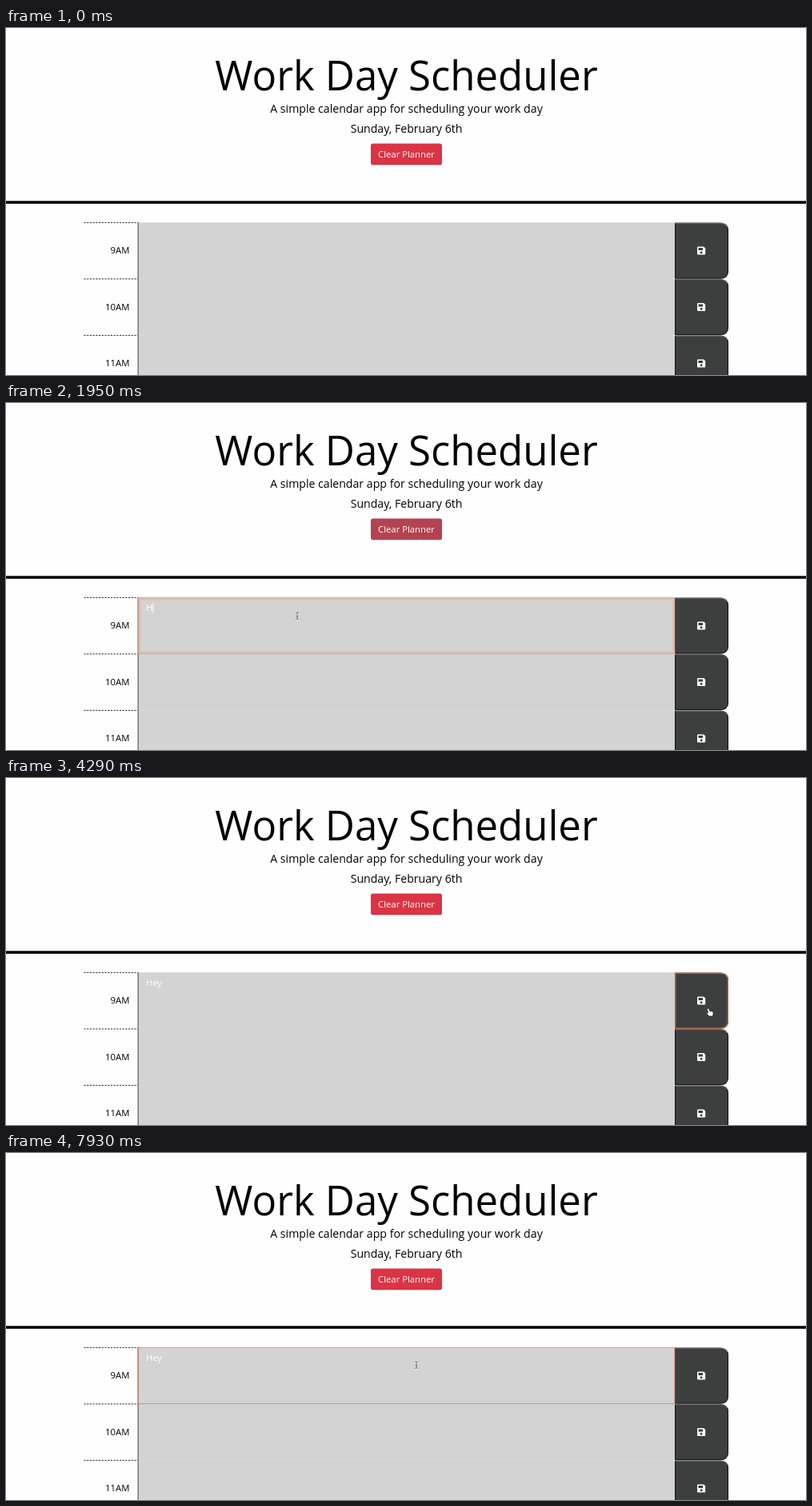
An HTML page for the animation above (8 s loop, 1000x434 px).

```html
<!DOCTYPE html>
<html lang="en">
<head>
<meta charset="utf-8">
<title>Work Day Scheduler</title>
<style>
  html, body { margin: 0; width: 100%; height: 100%; overflow: hidden; background: #fefefe; }
  svg { display: block; width: 100vw; height: 100vh; }
  text { font-family: "Open Sans", sans-serif; font-size: 11.3px; }
  .mid { text-anchor: middle; }
  .lead { font-size: 14.13px; }
</style>
</head>
<body>
<svg viewBox="0 0 1000 434">
  <defs>
    <g id="save">
      <path d="M0.5 0H67V0H57Q67 0 67 10V60Q67 70 57 70H0.5Z" fill="#3d3f3e"/>
      <path d="M0 .5H57Q63 .5 65.5 5" fill="none" stroke="#777"/>
      <path d="M65.5 5Q66.5 7 66.5 10V60Q66.5 69.5 57 69.5H.5V.5" fill="none" stroke="#111"/>
      <path fill="#fff" fill-rule="evenodd" d="M29 30H36.2L38.2 32V39Q38.2 40 37.2 40H29Q28 40 28 39V31Q28 30 29 30Z
        M29.5 31.5V34.3H35V31.5Z M33.1 35.6A1.5 1.5 0 1 0 33.1 38.6A1.5 1.5 0 1 0 33.1 35.6Z"/>
    </g>
  </defs>
  <rect width="1000" height="434" fill="#fefefe"/>
  <text class="mid" x="500.5" y="78" style="font-size:50.9px">Work Day Scheduler</text>
  <text class="mid lead" x="500.5" y="105.6">A simple calendar app for scheduling your work day</text>
  <text class="mid lead" x="500.5" y="131">Sunday, February 6th</text>
  <rect id="clear" x="456" y="144.5" width="89" height="26.7" rx="2.8"/>
  <text class="mid" x="500.5" y="162" fill="#fff">Clear Planner</text>
  <rect y="216.3" width="1000" height="3.5"/>
  <g id="rows"></g>
  <text id="note" x="174.9" y="260" fill="#fff"></text>
  <rect id="caret" y="250.5" width="1" height="12" fill="#fff"/>
  <rect id="glow" x="167" y="245.3" width="667" height="66.6" fill="none" stroke="#dfb08f" stroke-opacity=".5" stroke-width="3"/>
  <rect id="field" x="165.1" y="243.3" width="670.8" height="70.2" fill="none" stroke="#ee8a66"/>
  <path id="ring" d="M836.8 244.1H893Q902.4 244.1 902.4 254V303Q902.4 313 893 313H836.8Z" fill="none" stroke="#c96a42" stroke-width="1.3"/>
  <g id="beam" fill="none">
    <path d="M-2 -4.5H2M0 -4.5V4.5M-2 4.5H2" stroke="#f4f4f4" stroke-width="2.4"/>
    <path d="M-2 -4.5L0 -3.8L2 -4.5M0 -3.8V3.8M-2 4.5L0 3.8L2 4.5M-1 1H1" stroke="#555" stroke-width=".9"/>
  </g>
  <path id="arrow" d="M0 0V8.6L2 6.8L3.4 10L4.9 9.3L3.5 6.2H6.2Z" fill="#111" stroke="#fff" stroke-width=".7"/>
  <path id="hand" d="M-2.3 -4.6Q-1.4 -5.3 -.8 -4.3L.1 -1.6L3.4 -.9Q4.6 -.5 4.6 .8L4.3 3.2L3.6 5H-.6L-3.6 1.2Q-4 .1 -2.8 .2L-1.7 .9L-3 -3.5Q-3.1 -4.2 -2.3 -4.6Z"
    fill="#fff" stroke="#222" stroke-width=".7"/>
</svg>
<script>
const LOOP = 8000, STEP = 130;
const $ = id => document.getElementById(id);
const show = (id, on) => $(id).setAttribute('visibility', on ? 'visible' : 'hidden');
const between = (t, a, b) => t >= a && t < b;

$('rows').innerHTML = ['9AM', '10AM', '11AM'].map((hour, i) => {
  const y = 243.4 + i * 70.5;
  return `<path d="M97.5 ${y}H165" stroke="#222" stroke-dasharray="2.2 1.5"/>
    <text x="154.4" y="${y + 38.7}" text-anchor="end">${hour}</text>
    <rect x="165" y="${y - 0.2}" width="671" height="70.8" fill="#d3d3d3"/>
    <path d="M165.1 ${y}v70.5" stroke="#444"/>
    <use href="#save" x="836" y="${y + 0.2}"/>`;
}).join('');

// Pointer path: time, x, y
const path = [
  [520, 470, 372], [780, 392, 282], [1040, 364, 256], [1170, 364, 266], [2730, 364, 266],
  [2860, 560, 285], [3120, 929, 322], [3250, 929, 322], [3380, 905.5, 297.5],
  [3510, 889, 296], [3770, 879.5, 293], [5460, 879.5, 293],
  [5590, 838, 291], [5850, 620, 274], [6110, 513, 265], [LOOP, 513, 265]
];

function pointer(t) {
  const i = Math.max(1, path.findIndex(p => p[0] >= t));
  const [t0, x0, y0] = path[i - 1], [t1, x1, y1] = path[i];
  const k = (t - t0) / (t1 - t0);
  return [x0 + (x1 - x0) * k, y0 + (y1 - y0) * k];
}

function render(ms) {
  const t = Math.floor(ms / STEP) * STEP;
  const dull = between(t, 1950, 2340);
  $('clear').setAttribute('fill', dull ? '#b3434f' : '#da3445');

  const typed = t < 1950 ? 0 : t < 2340 ? 1 : t < 2470 ? 2 : 3;
  const note = $('note');
  note.textContent = 'Hey'.slice(0, typed);

  const focused = between(t, 1690, 4030) || t >= 6370;
  const since = t >= 6370 ? t - 6370 : t >= 2470 ? t - 2340 : 0;
  show('caret', focused && since % 1040 < 520);
  $('caret').setAttribute('x', 175 + (typed ? note.getComputedTextLength() : 0));
  show('field', focused);
  $('field').setAttribute('stroke', dull ? '#d9a78a' : '#ee8a66');
  show('glow', dull);
  show('ring', between(t, 4030, 6370));

  const [x, y] = pointer(Math.max(t, 520));
  const kind = x < 836 ? 'beam' : x < 903 ? 'hand' : 'arrow';
  for (const id of ['beam', 'hand', 'arrow']) {
    show(id, t >= 520 && id === kind);
    $(id).setAttribute('transform', `translate(${x} ${y})`);
  }
}

const start = performance.now();
function tick() {
  render((performance.now() - start) % LOOP);
  requestAnimationFrame(tick);
}
tick();
</script>
</body>
</html>
```
